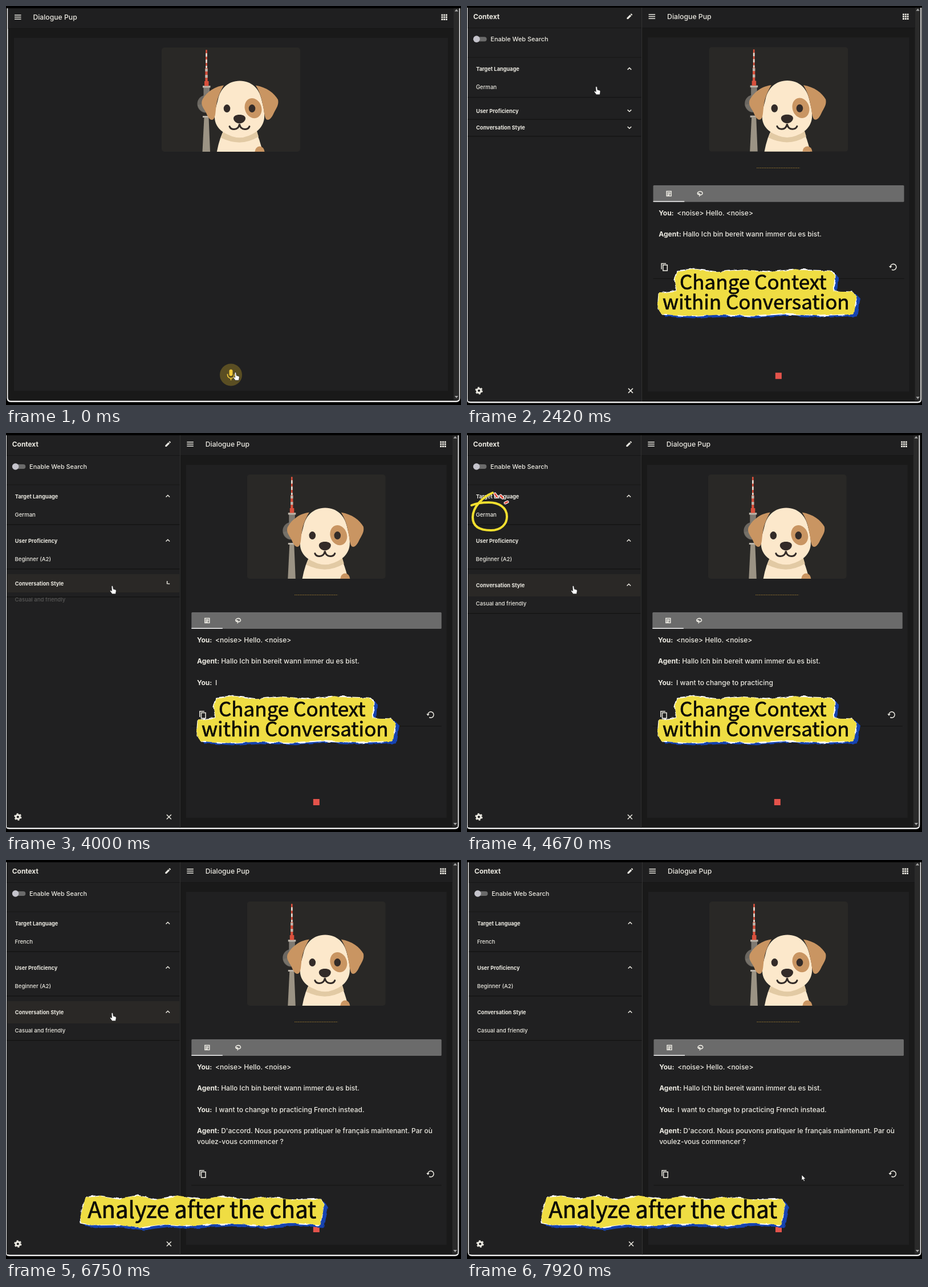
These frames come from a looping animation (798 px wide and 701 px high, 8000 ms). An HTML page:

```html
<!DOCTYPE html>
<html lang="en">
<head>
<meta charset="utf-8">
<title>Language practice demo</title>
<style>
  html, body { margin: 0; width: 100%; height: 100%; overflow: hidden; background: #000; }
  svg { display: block; width: 100vw; height: 100vh; }
  text { font-family: Inter, sans-serif; fill: #eceae2; white-space: pre; }
  .title { font-size: 12.2px; font-weight: 500; }
  .head { font-size: 11.9px; font-weight: 700; }
  .label { font-size: 9.2px; font-weight: 700; }
  .value { font-size: 9.6px; font-weight: 500; }
  .chat { font-size: 12px; font-weight: 500; }
  .chat .who { font-weight: 700; }
  .banner text { font-family: "Noto Sans CJK SC", "Noto Sans CJK JP", "Noto Sans", sans-serif; font-weight: 500; fill: #0b0b08; stroke: #0b0b08; stroke-width: .7px; }
  .line { fill: none; stroke: #eceae2; stroke-width: 1.5; }
  .light { fill: #eceae2; }
</style>
</head>
<body>
<svg viewBox="0 0 798 701" preserveAspectRatio="none">
  <defs>
    <filter id="torn" x="-10%" y="-20%" width="120%" height="140%" color-interpolation-filters="sRGB">
      <feTurbulence type="fractalNoise" baseFrequency=".06" numOctaves="2" seed="4"/>
      <feDisplacementMap in="SourceGraphic" scale="5" xChannelSelector="R" yChannelSelector="G"/>
    </filter>
    <filter id="tornEdge" x="-10%" y="-20%" width="120%" height="140%" color-interpolation-filters="sRGB">
      <feTurbulence type="fractalNoise" baseFrequency=".06" numOctaves="2" seed="11"/>
      <feDisplacementMap in="SourceGraphic" scale="7" xChannelSelector="R" yChannelSelector="G"/>
    </filter>
    <clipPath id="cardClip"><rect x="273" y="73" width="243" height="183" rx="5"/></clipPath>
    <path id="shape1" stroke-linejoin="round" d="M370 467L400 463L440 468L480 464L525 468L575 464L636 466L644 473L642 502L676 503L683 510L677 540L620 543L560 540L500 544L440 541L390 544L342 541L335 530L337 505L368 501L365 480Z"/>
    <path id="shape2" stroke-linejoin="round" d="M140 594L165 591L200 596L230 590L262 597L300 591L345 597L380 592L420 598L455 593L500 598L552 596L557 606L550 640L500 637L450 642L390 638L320 642L280 639L235 645L200 640L150 641L132 637L131 626Z"/>
  </defs>

  <g id="camera">
    <path fill="#e9e9e9" d="M1.5 4H796.5V689Q796.5 696 789.5 696H8.5Q1.5 696 1.5 689Z"/>
    <path fill="#191919" d="M3.5 4H794.5V688Q794.5 693.5 789 693.5H9Q3.5 693.5 3.5 688Z"/>
    <rect x="785" y="4" width="9.5" height="688" fill="#2a2a2a"/>
    <path fill="#a5a5a5" d="M786.8 9.5L790 5.5L793.2 9.5ZM786.8 685L790 689L793.2 685Z"/>
    <rect x="3.5" y="4" width="781.5" height="35" fill="#1f1f20"/>
    <path stroke="#151515" d="M3.5 39.5H785"/>
    <rect id="panel" y="56" height="620" fill="#202021"/>
    <path class="light" id="grid"/>

    <g id="main">
      <g clip-path="url(#cardClip)">
        <rect x="273" y="73" width="243" height="183" fill="#292826"/>
        <circle cx="351" cy="172" r="15.5" fill="#6b6761"/>
        <path fill="#88837a" d="M346 172A15 15 0 0 1 352 157V187Q340 186 336 174Z" opacity=".35"/>
        <path fill="#7f7a72" d="M346.5 143H357V160H346.5Z"/>
        <path fill="#b9b2a7" d="M345 140H358.5V143.5H345ZM345 193H358V196H345Z"/>
        <path fill="#9b9384" d="M347.5 196H355.5L358 256H344.5Z"/>
        <path stroke="#d8503c" stroke-width="2.6" d="M351.5 77V112"/>
        <path stroke="#e5dfd4" stroke-width="2.6" stroke-dasharray="6 5" d="M351.5 83V112"/>
        <path stroke="#d8503c" stroke-width="4.2" d="M351.5 109V133"/>
        <path stroke="#bdb7ad" stroke-width="4.2" stroke-dasharray="5 6" d="M351.5 110V133"/>
        <rect x="348" y="132" width="7.5" height="8.5" fill="#d8503c"/>
        <g transform="translate(0 .6)">
          <path fill="#fce8cb" d="M369 260Q374 231 383 216H437Q446 236 451 260Z"/>
          <path fill="#e2caa4" d="M381 220Q410 242 440 219L443 229Q412 248 377 231Z"/>
          <ellipse cx="445" cy="256" rx="8.5" ry="10" fill="#c99562"/>
          <path fill="#fce8cb" d="M410 131C431 131 444 145 448 163C451 176 454 185 453 196C451 216 433 229 410 229C386 229 367 216 366 196C365 185 369 176 372 163C376 145 389 131 410 131Z"/>
          <path fill="#c99562" d="M382 139C364 141 350 153 344 165C341 174 347 179 351 187C354 195 358 201 363 199C368 196 367 185 369 173C371 160 376 149 382 139ZM438 139C457 142 471 153 477 164C479 173 474 179 470 187C466 196 462 201 457 199C453 196 453 184 450 172C448 159 444 149 438 139Z"/>
          <ellipse cx="433.5" cy="179" rx="14.5" ry="18" fill="#c99562" transform="rotate(-20 433.5 179)"/>
          <ellipse cx="387.5" cy="179.5" rx="5.8" ry="7" fill="#332b28"/>
          <ellipse cx="431.5" cy="179.5" rx="5.8" ry="7" fill="#332b28"/>
          <path fill="#332b28" d="M409.5 190.5C416 190.5 420 193 420 197C420 202 414 206 409.5 206S399 202 399 197C399 193 403 190.5 409.5 190.5Z"/>
          <path fill="none" stroke="#332b28" stroke-width="3" stroke-linecap="round" d="M392 211Q394 216 400 216Q408 216 409.5 207Q411 216 419 216Q425 216 427 211"/>
        </g>
      </g>
      <g id="mic">
        <circle cx="394.5" cy="648" r="19.5" fill="#5a4e23"/>
        <rect x="391.5" y="638.5" width="6" height="11.5" rx="3" fill="#f2ca3a"/>
        <path fill="none" stroke="#f2ca3a" stroke-width="1.7" d="M388.5 646.5V648A6 6 0 0 0 400.5 648V646.5M394.5 654V657.5"/>
      </g>
    </g>

    <g id="session">
      <path stroke="#a98332" stroke-width="1.1" stroke-dasharray="1.5 1.5" d="M508.5 284.5H584"/>
      <path id="cardEdge" stroke="#171717" stroke-width="1.5"/>
      <rect x="327.5" y="315" width="438.5" height="29" rx="1.5" fill="#6b6b6b"/>
      <rect x="327.5" y="342.6" width="54.5" height="1.4" fill="#fff"/>
      <path class="line" d="M351 325.5H359V333.5H351ZM352.5 328H357.5M352.5 330H357.5M352.5 332H356"/>
      <path class="line" d="M406 331Q404 329 406 327Q409 324.500 412.500 326.500Q415 329 412.500 331Q410 332.500 406 331Q405 329.500 408 329.500Q410 331 408 334.500"/>
      <g id="messages"></g>
      <g id="tools">
        <path class="line" d="M342 4V-6H350M344.7 -3.5H352.2V6.3H344.7Z"/>
        <path class="line" d="M742.2 -1.5A5.2 5.2 0 1 1 744.5 4.500"/>
        <path class="light" d="M739.500 -1.500H745L742.200 2Z"/>
      </g>
      <rect x="541" y="643" width="11" height="11" fill="#e4534b"/>

      <rect x="3.5" y="4" width="303.5" height="689" fill="#202021"/>
      <path stroke="#343434" d="M307.5 4V693.5"/>
      <path stroke="#161616" d="M3.5 39.5H307M3.5 91H307"/>
      <text class="head" x="13" y="23.7">Context</text>
      <path class="light" d="M281.5 24V21.7L287 16.2L289.3 18.5L283.8 24ZM287.7 15.5L288.6 14.6Q289.2 14.2 289.8 14.7L290.9 15.8Q291.3 16.3 290.9 16.9L290 17.8Z"/>
      <rect x="15" y="55" width="21.5" height="8" rx="4" fill="#6a6a6a"/>
      <circle cx="18.8" cy="59" r="5.8" fill="#c4c3cb"/>
      <text style="font-size:10.9px;font-weight:500" x="43.3" y="63">Enable Web Search</text>
      <g id="sections"></g>
      <circle cx="23" cy="674.5" r="3.6" fill="none" stroke="#eceae2" stroke-width="3"/>
      <circle cx="23" cy="674.5" r="5.7" fill="none" stroke="#eceae2" stroke-width="1.8" stroke-dasharray="3 2.97"/>
      <path class="line" d="M284 670.5L292 678.5M292 670.5L284 678.5"/>
    </g>
    <g id="appTitle">
      <path class="line" d="M319.5 16H331M319.5 19.5H331M319.5 23H331"/>
      <text class="title" x="352" y="23.7">Dialogue Pup</text>
    </g>
  </g>

  <g id="banner1" class="banner">
    <use href="#shape1" x="6.5" y="4" fill="#1643b0" stroke="#1643b0" filter="url(#torn)"/>
    <use href="#shape1" fill="#fff" stroke="#fff" stroke-width="3" filter="url(#tornEdge)"/>
    <use href="#shape1" fill="#efdd43" stroke="#efdd43" filter="url(#torn)"/>
    <text x="373" y="498" font-size="35">Change Context</text>
    <text x="343" y="533" font-size="35">within Conversation</text>
  </g>
  <g id="banner2" class="banner">
    <use href="#shape2" x="6.5" y="5" fill="#1643b0" stroke="#1643b0" filter="url(#torn)"/>
    <use href="#shape2" fill="#fff" stroke="#fff" stroke-width="3" filter="url(#tornEdge)"/>
    <use href="#shape2" fill="#efdd43" stroke="#efdd43" filter="url(#torn)"/>
    <text x="143.3" y="629" font-size="40">Analyze after the chat</text>
  </g>
  <g id="marker" fill="none" stroke-linecap="round">
    <path id="loop" pathLength="1" stroke="#f2df2f" stroke-width="4" d="M45 105C28 112 10 130 10 148C10 166 25 171 42 171C60 171 70 160 70 147C70 130 55 122 38 122C26 122 15 124 8 127"/>
    <path id="sparkEdge" stroke="#fff" stroke-width="5"/>
    <path id="sparks" stroke="#df4a3c" stroke-width="3"/>
  </g>
  <g id="cursor">
    <path id="hand" transform="translate(1 .8)" fill="#fff" stroke="#222" stroke-width=".7" d="M-3 -6.5Q-1.7 -8 -.5 -6.5L.3 -1.5L4 -.5Q5.5 0 5.2 2L4.3 7H-1.8L-5.5 2Q-5.5 .2 -4 .8L-2.4 2Z"/>
    <path id="arrow" fill="#fff" stroke="#111" stroke-width=".8" d="M-2 -5V5L.2 3L1.8 6.5L3.5 5.7L2 2.3H5Z"/>
  </g>
</svg>
<script>
const LOOP = 8000, OPENED = 420, RECUT = 3820, LAST_CUT = 7700;
const $ = id => document.getElementById(id);
const clamp = v => Math.max(0, Math.min(1, v));
const ease = v => v * v * (3 - 2 * v);
const progress = (t, start, length) => ease(clamp((t - start) / length));
const show = (id, on) => $(id).style.display = on ? '' : 'none';
const set = (el, attrs) => { for (const k in attrs) el.setAttribute(k, attrs[k]); };
const add = (parent, tag, attrs = {}, text = '') => {
  const el = document.createElementNS('http://www.w3.org/2000/svg', tag);
  set(el, attrs);
  el.textContent = text;
  return parent.appendChild(el);
};

let dots = '';
for (let i = 0; i < 9; i++) dots += `M${763.5 + i % 3 * 3.8} ${14.5 + Math.floor(i / 3) * 3.8}h2.8v2.8h-2.8z`;
$('grid').setAttribute('d', dots);

// Each part of a message: the time its first word shows, ms per word, text.
const messages = [
  { y: 367.7, who: 'You:  ', parts: [[OPENED, 0, '<noise> Hello. <noise>']] },
  { y: 405, who: 'Agent: ', parts: [[500, 75, 'Hallo Ich bin bereit wann immer du es bist.']] },
  { y: 442.5, who: 'You:  ', parts: [[4000, 100, 'I want to change to practicing'], [5200, 180, ' French instead.']] },
  { y: 479.8, who: 'Agent: ', parts: [[5980, 45, "D'accord. Nous pouvons pratiquer le français maintenant. Par où"]] },
  { y: 498.5, who: '', parts: [[6430, 45, 'voulez-vous commencer ?']] }
];
for (const m of messages) {
  m.el = add($('messages'), 'text', { class: 'chat', x: 337.2, y: m.y });
  add(m.el, 'tspan', { class: 'who' }, m.who);
  m.body = add(m.el, 'tspan');
}
const typed = (t, [start, pace, text]) => {
  if (t < start) return '';
  return pace ? text.split(/(?<=\S)(?= )/).slice(0, 1 + Math.floor((t - start) / pace)).join('') : text;
};

const sections = [
  ['Target Language', 'German', 1650],
  ['User Proficiency', 'Beginner (A2)', 3240],
  ['Conversation Style', 'Casual and friendly', 3920]
].map(([label, value, opensAt]) => {
  const g = add($('sections'), 'g');
  return {
    g, opensAt,
    row: add(g, 'rect', { x: 3.5, width: 303, fill: '#2a2826' }),
    label: add(g, 'text', { class: 'label', x: 18 }, label),
    value: add(g, 'text', { class: 'value', x: 17.7 }, value),
    chevron: add(g, 'path', { class: 'line', d: 'M-3.3 -1.5L0 1.7L3.3 -1.5' }),
    edge: add(g, 'path', { stroke: '#151515', 'stroke-width': 1.5 })
  };
});

const cursorStops = [
  [0, 403, 650], [OPENED - 1, 403, 650], [OPENED, 318, 28], [800, 300, 40], [1200, 242, 101], [1950, 238, 106],
  [2900, 217, 191], [3440, 217, 191], [3840, 187, 275], [LAST_CUT - 1, 187, 275], [LAST_CUT, 589, 558], [LOOP, 589, 558]
];
function cursorAt(t) {
  const i = cursorStops.findIndex(s => s[0] > t);
  const [t0, x0, y0] = cursorStops[i - 1], [t1, x1, y1] = cursorStops[i];
  const p = ease((t - t0) / (t1 - t0));
  return [x0 + (x1 - x0) * p, y0 + (y1 - y0) * p];
}

function drawSections(t, [cx, cy]) {
  let y = 92, before = 0;
  sections.forEach((s, i) => {
    const p = progress(t, s.opensAt, 240);
    if (i) y += 9 * Math.max(p, before);
    const h = 29.5 + 9.5 * p, mid = y + h / 2, end = y + h + 30 * p;
    const hovered = cx < 305 && cy >= y && cy < y + h;
    set(s.row, { y, height: h, opacity: hovered ? 1 : 0 });
    set(s.label, { y: mid + 3.5 });
    set(s.value, { y: y + h + 15.8, opacity: p });
    set(s.chevron, { transform: `translate(286 ${mid - .5}) rotate(${180 * p})` });
    set(s.edge, { d: `M3.5 ${end}H306.5` });
    y = end;
    before = p;
  });
  sections[0].value.textContent = t < 5400 ? 'German' : 'French';
}

function drawMarker(t) {
  const drawn = clamp((t - 4300) / 300);
  set($('loop'), { 'stroke-dasharray': `${drawn} 2` });
  const reach = .75 + .25 * Math.cos((t - 4300) / 740 * 2 * Math.PI);
  const d = drawn < 1 ? '' : [[49, 107, 7, 10], [59, 110, 7, 8], [67, 123, 8, -4]]
    .map(([x, y, dx, dy]) => `M${x} ${y}l${dx * reach} ${dy * reach}`).join('');
  set($('sparks'), { d });
  set($('sparkEdge'), { d });
}

function draw() {
  const t = performance.now() % LOOP;
  const open = t >= OPENED;
  const camera = !open || t >= LAST_CUT ? '' : t < RECUT
    ? 'translate(-2.1 -1.07) scale(1.0035 1.0036)' : 'translate(-2.2 0)';
  set($('camera'), { transform: camera });
  set($('main'), { transform: `translate(${open ? 152 : 0} 0)` });
  set($('appTitle'), { transform: `translate(${open ? 0 : -304.5} 0)` });
  set($('panel'), { x: open ? 318 : 14, width: open ? 457 : 761 });
  show('mic', !open);
  show('session', open);

  for (const m of messages) {
    m.el.style.display = t < m.parts[0][0] ? 'none' : '';
    m.body.textContent = m.parts.map(p => typed(t, p)).join('');
  }
  const bottom = t < 4000 ? 478 : t < 5980 ? 515 : t < 6430 ? 552.5 : 571.5;
  set($('cardEdge'), { d: `M327.5 ${bottom}H766` });
  set($('tools'), { transform: `translate(0 ${bottom - 20})` });

  const cursor = cursorAt(t);
  drawSections(t, cursor);
  set($('cursor'), { transform: `translate(${cursor})` });
  show('hand', t < LAST_CUT);
  show('arrow', t >= LAST_CUT);

  show('banner1', t >= 2100 && t < 6250);
  show('banner2', t >= 6450);
  show('marker', t >= 4300 && t < 6250);
  drawMarker(t);
  requestAnimationFrame(draw);
}
draw();
</script>
</body>
</html>
```
